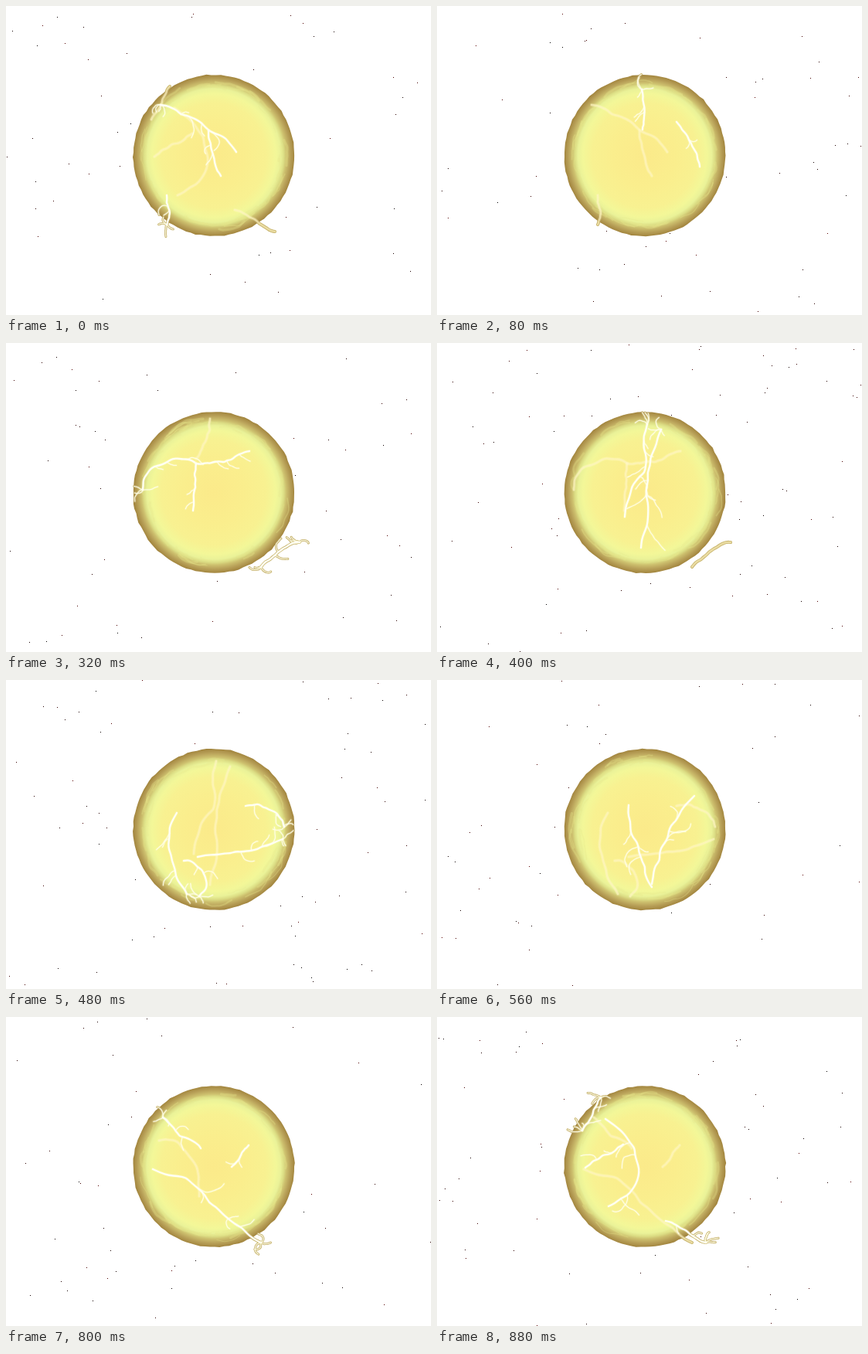
An HTML page with a canvas that plays this animation: 550 px wide and 400 px high, repeating every 0.96 s.

```html
<!DOCTYPE html>
<html lang="en">
<head>
<meta charset="utf-8">
<title>Plasma ball</title>
<style>
  html, body { margin: 0; width: 100%; height: 100%; overflow: hidden; background: #fff; }
  canvas { display: block; width: 550px; height: 400px; }
</style>
</head>
<body>
<canvas id="stage" width="550" height="400"></canvas>
<script>
const STEP = 80, W = 550, H = 400, TAU = Math.PI * 2;
const CX = 269, CY = 193.5, R = 104.3;
const ctx = document.getElementById('stage').getContext('2d');

// Main strikes of each step: from x, y to x, y and an optional sideways bow.
const strikes = [
  [[200, 128, 298, 189], [262, 161, 278, 220], [208, 245, 208, 283]],
  [[265, 108, 266, 160], [310, 150, 340, 208]],
  [[328, 108, 242, 223, .12], [286, 166, 350, 272], [254, 166, 210, 235]],
  [[264, 98, 246, 150]],
  [[177, 190, 246, 156, -.3], [246, 156, 315, 140], [246, 156, 242, 217], [330, 290, 380, 258]],
  [[272, 105, 243, 225], [290, 112, 264, 265]],
  [[221, 172, 234, 277, .12], [248, 229, 358, 206], [310, 163, 360, 190, -.2], [230, 234, 250, 280, -.3]],
  [[248, 162, 278, 268, .08], [278, 264, 333, 150, -.15]],
  [[240, 94, 247, 165, .12], [190, 212, 188, 248, -.3], [320, 235, 345, 266]],
  [[198, 160, 250, 232, -.25]],
  [[190, 197, 330, 292, -.12], [203, 130, 252, 170], [314, 166, 292, 194]],
  [[218, 132, 222, 245, -.25], [241, 165, 192, 195], [296, 264, 348, 292], [188, 147, 212, 104]]
];

const looks = {
  ghost: { width: 2.4, colour: 'rgba(255,244,194,.65)' },
  thin:  { width: 1.3, colour: 'rgba(255,255,236,.85)' },
  hot:   { width: 2.3, colour: '#fffff4' }
};

function random(seed) {
  let s = seed * 7919 + 17;
  return () => {
    s = (s + 0x6D2B79F5) | 0;
    let t = Math.imul(s ^ (s >>> 15), 1 | s);
    t = (t + Math.imul(t ^ (t >>> 7), 61 | t)) ^ t;
    return ((t ^ (t >>> 14)) >>> 0) / 4294967296;
  };
}

const polar = (r, a) => [CX + r * Math.cos(a), CY + r * Math.sin(a)];

// Midpoint of a and b, pushed sideways by a share of their distance.
function bend([ax, ay], [bx, by], k) {
  return [(ax + bx) / 2 - (by - ay) * k, (ay + by) / 2 + (bx - ax) * k];
}

function fractal(a, b, bow, depth, rnd) {
  if (!depth) return [a, b];
  const mid = bend(a, b, bow + (rnd() - .5) * .2);
  return [...fractal(a, mid, bow / 2, depth - 1, rnd),
          ...fractal(mid, b, bow / 2, depth - 1, rnd).slice(1)];
}

function smooth(points) {
  const path = new Path2D();
  path.moveTo(...points[0]);
  for (let i = 1; i < points.length - 1; i++)
    path.quadraticCurveTo(...points[i], ...bend(points[i], points[i + 1], 0));
  path.lineTo(...points[points.length - 1]);
  return path;
}

function twig([x, y], angle, length, rnd) {
  const end = [x + length * Math.cos(angle), y + length * Math.sin(angle)];
  return smooth(fractal([x, y], end, (rnd() - .5) * .6, 3, rnd));
}

// One strike with side twigs, and a tangle where it meets the glass.
function strike([x0, y0, x1, y1, bow = 0], rnd) {
  const line = fractal([x0, y0], [x1, y1], bow, 4, rnd);
  const length = Math.hypot(x1 - x0, y1 - y0), dir = Math.atan2(y1 - y0, x1 - x0);
  const twigs = [];
  for (let n = 0; n < length / 35; n++) {
    const from = line[3 + Math.floor(rnd() * 12)];
    twigs.push(twig(from, dir + (rnd() < .5 ? -.8 : .8), 10 + rnd() * length * .2, rnd));
  }
  for (const [x, y] of [[x0, y0], [x1, y1]])
    if (Math.hypot(x - CX, y - CY) > 84)
      for (let n = 0; n < 4; n++) twigs.push(twig([x, y], rnd() * TAU, 8 + rnd() * 12, rnd));
  return { main: smooth(line), twigs };
}

const steps = strikes.map((list, i) => {
  const rnd = random(i + 60);
  return list.map(s => strike(s, rnd));
});

// Every strike lingers for one more step as a pale ghost.
function boltsAt(i) {
  const before = steps[(i + steps.length - 1) % steps.length];
  const out = before.map(s => [s.main, looks.ghost]);
  for (const s of steps[i]) out.push(...s.twigs.map(t => [t, looks.thin]), [s.main, looks.hot]);
  return out;
}

function stroke(path, width, colour) {
  ctx.lineWidth = width;
  ctx.strokeStyle = colour;
  ctx.stroke(path);
}

const glow = ctx.createRadialGradient(CX, CY, 0, CX, CY, R);
[[0, '#fbea8a'], [.4, '#faee8d'], [.65, '#f8f191'], [.77, '#f3f798'], [.83, '#eaf298'],
 [.87, '#dbdc83'], [.9, '#cdc06e'], [.95, '#b8a058'], [1, '#a3863f']]
  .forEach(([at, colour]) => glow.addColorStop(at, colour));

function drawSpecks(rnd) {
  const count = 50 + rnd() * 35;
  for (let n = 0; n < count; n++) {
    ctx.fillStyle = `rgb(${Math.floor(rnd() * 90)},0,0)`;
    ctx.fillRect(Math.floor(rnd() * W), Math.floor(rnd() * H), 1, 1);
  }
}

// Ball with a slightly ragged outline.
function drawBall(rnd) {
  ctx.fillStyle = glow;
  ctx.beginPath();
  for (let a = 0; a < TAU; a += .06)
    ctx.lineTo(...polar(R + rnd() * rnd() * 1.4 - .3, a));
  ctx.fill();
}

function drawWisps(rnd) {
  for (let n = 0; n < 36; n++) {
    const a = rnd() * TAU, r = 85 + rnd() * 11;
    const line = fractal(polar(r, a), polar(r + rnd() * 6 - 3, a + .15 + rnd() * .35), -.08, 3, rnd);
    stroke(smooth(line), 1 + rnd() * 2.5, 'rgba(233,231,140,.3)');
  }
}

function draw(i) {
  const rnd = random(i + 1), bolts = boltsAt(i);
  ctx.fillStyle = '#fff';
  ctx.fillRect(0, 0, W, H);
  ctx.lineCap = ctx.lineJoin = 'round';
  drawSpecks(rnd);
  for (const [path, { width }] of bolts) stroke(path, width + 1.6, '#b59c50');
  drawBall(rnd);
  drawWisps(rnd);
  for (const [path, { width, colour }] of bolts) {
    stroke(path, width + 2, 'rgba(255,252,205,.2)');
    stroke(path, width, colour);
  }
}

let shown = -1;
function tick() {
  const i = Math.floor(performance.now() / STEP) % steps.length;
  if (i !== shown) draw(shown = i);
  requestAnimationFrame(tick);
}
tick();
</script>
</body>
</html>
```
